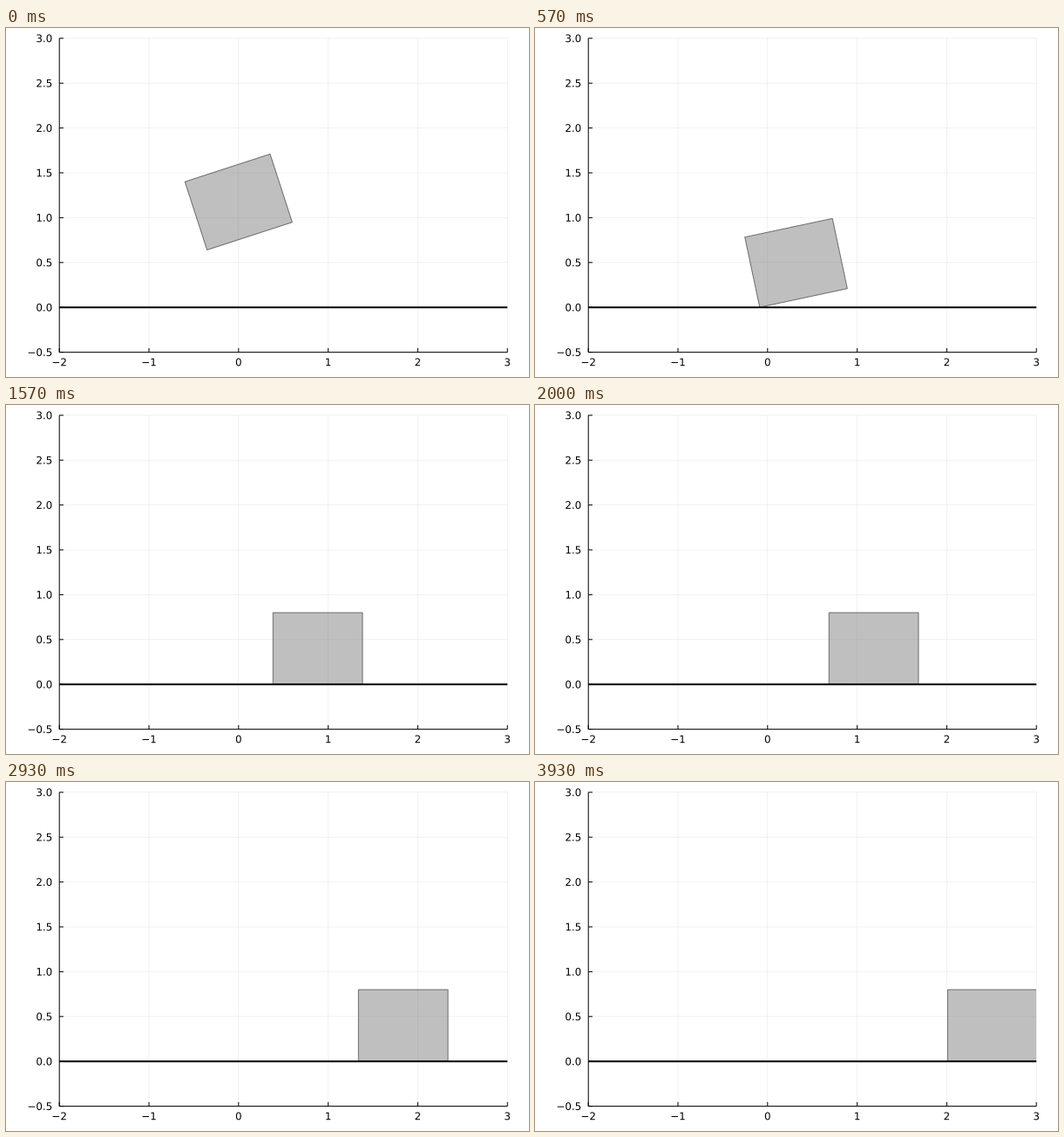
Write a matplotlib script that moves like this. It is 600 by 400 pixels and loops after 4 s.

```python
import math

import matplotlib.pyplot as plt
import numpy as np
from matplotlib.animation import FuncAnimation
from matplotlib.patches import PathPatch, Polygon, Rectangle
from matplotlib.textpath import TextPath
from matplotlib.transforms import Affine2D

DPI, WIDTH, HEIGHT = 100, 600, 400
LOOP_MS, TICK_MS, RATE = 4000, 20, 14

# Plot area in pixels, y pointing down; one data unit is UNIT pixels.
LEFT, RIGHT, TOP, BOTTOM = 61.21, 575.21, 11.81, 371.61
UNIT = (RIGHT - LEFT) / 5
TICK, FONT_PX = 4.72, 11.85
ADVANCE = {"\u2212": 0.838, ".": 0.318}        # in em; digits are 0.636

BOX_W, BOX_H = 1.0, 0.8
GRAVITY, STEP, END = 9.81, 0.05, 2.5
START = np.array([0.0, 1.175, math.pi / 10])   # x, y, angle
IMPACT_T, SLIDE_T = 0.372, 0.43
VEL_X, SPIN, SLIDE_V = 0.855, -0.281, 1.004
REST_X = 0.420                                 # centre once lying flat
SLIDE_X = 0.482                                # centre one step after release


def to_px(x, y):
    return LEFT + (x + 2) * UNIT, BOTTOM - (y + 0.5) * UNIT


def falling(t):
    x, y, angle = START
    return x + VEL_X * t, y - GRAVITY * t * t / 2, angle + SPIN * t


def pose(step):
    """Centre and angle: free fall, corner impact, flat impact, sliding."""
    if step < 10:
        return falling(min(step * STEP, IMPACT_T))
    if step < 14:
        return REST_X, BOX_H / 2, 0.0
    t = min(SLIDE_T + STEP * (step - 13), END)
    return SLIDE_X + SLIDE_V * (t - SLIDE_T - STEP), BOX_H / 2, 0.0


def corners(x, y, angle):
    c, s = math.cos(angle), math.sin(angle)
    half = np.array([(-1, -1), (1, -1), (1, 1), (-1, 1)]) * (BOX_W / 2, BOX_H / 2)
    points = half @ np.array([(c, s), (-s, c)]) + (x, y)
    return np.column_stack(to_px(points[:, 0], points[:, 1]))


fig = plt.figure(figsize=(WIDTH / DPI, HEIGHT / DPI), dpi=DPI, facecolor="white")
ax = fig.add_axes([0, 0, 1, 1])
ax.set(xlim=(0, WIDTH), ylim=(HEIGHT, 0))
ax.axis("off")


def line(x0, y0, x1, y1, width=1.0, alpha=1.0, zorder=4):
    ax.plot([x0, x1], [y0, y1], color="black", alpha=alpha, zorder=zorder,
            linewidth=width * 72 / DPI, solid_capstyle="butt", snap=False)


def label(value, digits, x, baseline, align):
    """Draw a number; align is the share of its width lying left of x."""
    text = f"{value:.{digits}f}".replace("-", "\u2212")
    width = FONT_PX * sum(ADVANCE.get(char, 0.636) for char in text)
    glyphs = TextPath((0, 0), text, size=FONT_PX, prop={"family": "DejaVu Sans"})
    place = Affine2D().scale(1, -1).translate(x - align * width, baseline)
    ax.add_patch(PathPatch(glyphs.transformed(place), facecolor="black",
                           linewidth=0, snap=False))


for value in range(-2, 4):
    x, _ = to_px(value, 0)
    line(x, TOP, x, BOTTOM, width=0.5, alpha=0.1, zorder=1)
    line(x, BOTTOM, x, BOTTOM - TICK)
    label(value, 0, x, BOTTOM + 15.6, 0.5)

for value in np.arange(-0.5, 3.1, 0.5):
    _, y = to_px(0, value)
    line(LEFT, y, RIGHT, y, width=0.5, alpha=0.1, zorder=1)
    line(LEFT, y, LEFT + TICK, y)
    label(value, 1, LEFT - 7.97, y + 4.32, 1)

line(LEFT, TOP, LEFT, BOTTOM)
line(LEFT, BOTTOM, RIGHT, BOTTOM)
_, ground = to_px(0, 0)
line(LEFT, ground, RIGHT, ground, width=2, zorder=3)

box = Polygon(corners(*START), closed=True, facecolor=(0.5, 0.5, 0.5, 0.5),
              edgecolor=(0, 0, 0, 0.5), linewidth=72 / DPI, zorder=2, snap=False)
ax.add_patch(box)
box.set_clip_path(Rectangle((LEFT, TOP), RIGHT - LEFT, BOTTOM - TOP,
                            transform=ax.transData))


def update(frame):
    step = int((frame * TICK_MS + 15) * RATE / 1000)
    box.set_xy(corners(*pose(step)))
    return (box,)


anim = FuncAnimation(fig, update, frames=LOOP_MS // TICK_MS, interval=TICK_MS,
                     repeat=True, repeat_delay=0)
plt.show()
```
